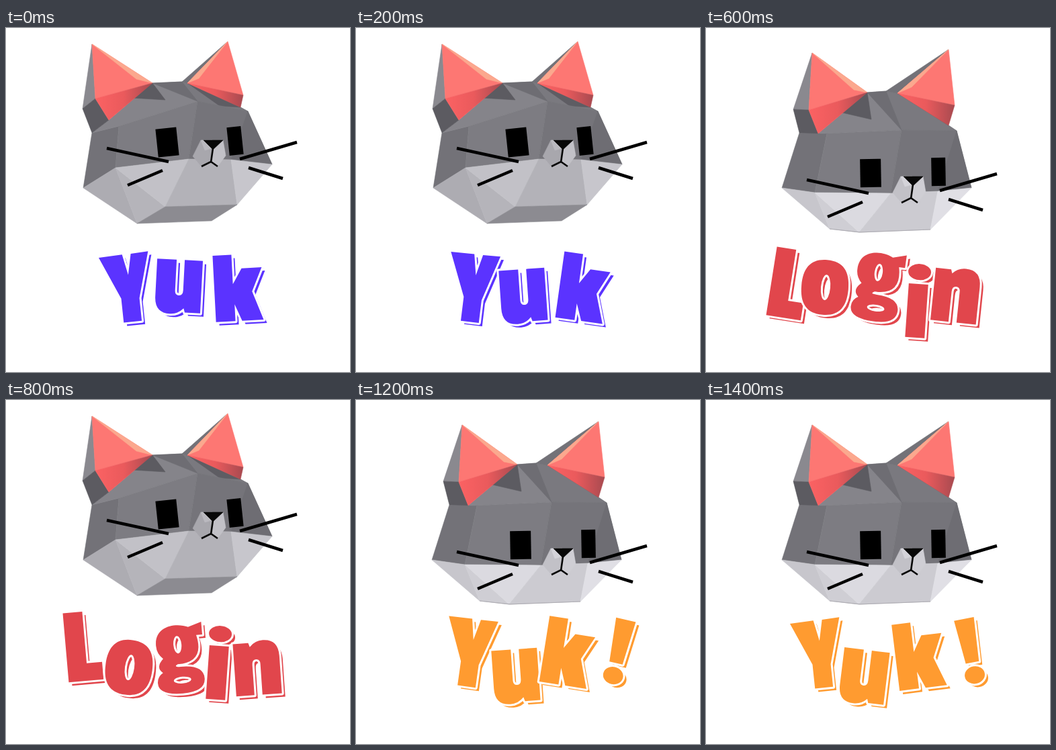
An HTML page that plays this animation: 512 by 512 pixels, repeating every 1600 ms.

```html
<!DOCTYPE html>
<html lang="id">
<head>
<meta charset="utf-8">
<title>Yuk Login</title>
<style>
html, body { margin: 0; width: 100%; height: 100%; overflow: hidden; background: #fff; }
svg { display: block; width: 100%; height: 100%; }
</style>
</head>
<body>
<svg id="stage" viewBox="0 0 512 512" role="img" aria-label="Yuk Login Yuk!">
  <defs>
    <linearGradient id="shade" x2="1">
      <stop offset="0" stop-color="#fb6263"/><stop offset="0.5" stop-color="#ea5a5c"/><stop offset="1" stop-color="#a84a50"/>
    </linearGradient>
  </defs>
</svg>
<script>
const NS = "http://www.w3.org/2000/svg";
const stage = document.getElementById("stage");

function add(parent, tag, attrs) {
  const el = document.createElementNS(NS, tag);
  for (const key in attrs) el.setAttribute(key, attrs[key]);
  parent.appendChild(el);
  return el;
}

const grey = light => {
  const v = Math.round(light * 255);
  return `rgb(${v},${v - 1},${v + 5})`;
};

function facet(parent, points, fill) {
  add(parent, "polygon", { points, fill, stroke: fill, "stroke-width": 0.6, "stroke-linejoin": "round" });
}

// One mesh for both head poses: corners are named by these letters, in order
const corners = "ABCDEFGHIJKLMNOPRSTUVWXYZcef";
const fur = {
  FMRL: 0.45, DEHIKONMF: 0.52, HIKON: 0.48, EHN: 0.43, EZY: 0.36, IcK: 0.37,
  MNSR: 0.49, NOPTS: 0.46, OPT: 0.43
};
const mask = { LRU: 0.68, RVU: 0.71, RSV: 0.76, STWV: 0.70, TPW: 0.78, UVWX: 0.55 };
const ears = {
  ABC: grey(0.54), BCDF: grey(0.36), ACE: "#fd7773", AEe: "#fba88e", CED: "url(#shade)",
  GHI: grey(0.45), GIJ: "#fd7773", GIf: "#fba88e", IJK: "url(#shade)"
};

const poses = [
  {
    mesh: "128,24 114,120 133,105 153,137 218,82 128,156 330,20 262,80 270,82 353,100 349,118 " +
      "115,238 168,146 285,109 360,124 396,203 163,208 272,195 335,196 195,291 237,266 344,263 " +
      "306,287 237,107 187,104 318,116 194,76 287,75",
    glow: 0, eyes: [0, 0], eyeTurn: -6, muzzle: [0, 0], whiskers: [0, 0]
  },
  {
    mesh: "158,37 130,121 153,122 167,157 240,96 139,156 361,32 268,94 285,97 370,115 361,145 " +
      "113,238 180,157 291,152 373,153 395,238 162,245 275,246 345,243 184,299 228,304 334,300 " +
      "230,304 246,136 203,126 332,126 220,92 306,88",
    glow: 0.1, eyes: [5, 46], eyeTurn: -1, muzzle: [0, 54], whiskers: [0, 47]
  }
];

function makeCat({ mesh, glow, eyes, eyeTurn, muzzle, whiskers }) {
  const cat = add(stage, "g", {});
  const at = mesh.split(" ");
  const pick = names => [...names].map(c => at[corners.indexOf(c)]).join(" ");
  const group = ([x, y]) => add(cat, "g", { transform: `translate(${x} ${y})` });

  for (const names in fur) facet(cat, pick(names), grey(fur[names]));
  for (const names in mask) facet(cat, pick(names), grey(mask[names] + glow));
  for (const names in ears) facet(cat, pick(names), ears[names]);

  const look = group(eyes);
  for (const [x, y, w] of [[240, 170, 31], [341, 168, 21]])
    add(look, "rect", { x: -w / 2, y: -21, width: w, height: 42, transform: `translate(${x} ${y}) rotate(${eyeTurn})` });

  const nose = group(muzzle);
  facet(nose, "278,191 290,167 307,179 305,200 291,206", grey(0.66 + glow));
  facet(nose, "307,179 323,167 327,190 315,206 305,200", grey(0.76 + glow / 2));
  facet(nose, "290,167 307,167 307,179 296,182", grey(0.73 + glow));
  facet(nose, "294,167 323,167 308,181", "#080808");
  add(nose, "path", { d: "M308 179L305 200M291 206L305 199L315 206", fill: "none", stroke: "#080808", "stroke-width": 2.6 });

  add(group(whiskers), "path", {
    d: "M150 179L242 199M181 234L233 212M348 195L433 170M361 208L412 224", stroke: "#000", "stroke-width": 4.5
  });
  return cat;
}

// Letter outlines around their own centre
const oval = (x, y, rx, ry) =>
  `M${x - rx},${y}a${rx},${ry} 0 1 0 ${2 * rx},0a${rx},${ry} 0 1 0 ${-2 * rx},0Z`;

const glyphs = {
  Y: "M-35,-50L0,-51L6,-20L13,-51L39,-52L19,16V50H-8V14Z",
  u: "M-35,-40H-6V6Q-6,13 0,13Q6,13 6,5V-40H33V38H10L8,32Q0,41 -12,41Q-35,41 -35,16Z",
  k: "M-35,-50H-7V-6L7,-29H37L21,6L36,49H4L-6,24V49H-35Z",
  "!": "M-15,-48H15L10,18H-10Z" + oval(0, 37, 15, 13),
  L: "M-27,-53H2V24H25V50H-27Z",
  o: "M0,-41C24,-41 35,-27 35,0C35,27 24,41 0,41C-24,41 -35,27 -35,0C-35,-27 -24,-41 0,-41Z" + oval(1, 0, 7, 19),
  g: "M36,-52V-33H27Q37,8 -4,8Q-12,12 0,12Q34,12 34,32Q34,52 0,52Q-36,52 -36,34Q-36,24 -27,19" +
     "Q-38,10 -25,-2Q-34,-10 -34,-22C-34,-52 -2,-54 16,-46Z" + oval(-2, -21, 6, 13) + oval(1, 32, 13, 5),
  i: "M-15,-26H14V54H-15Z" + oval(0, -44, 17, 12)
};

function makeWord([color, ...letters]) {
  const word = add(stage, "g", { "fill-rule": "evenodd", fill: color, "stroke-linejoin": "round" });
  for (const [char, x, y, turn] of letters) {
    // "n" is an upside-down "u"
    const d = glyphs[char === "n" ? "u" : char];
    const spin = char === "n" ? turn + 180 : turn;
    const draw = (shift, outline) => add(word, "path", {
      d, transform: `translate(${x + shift} ${y + shift}) rotate(${spin})`, ...outline
    });
    draw(5);
    draw(0, { stroke: "#fff", "stroke-width": 6, "paint-order": "stroke" });
  }
  return word;
}

const purple = "#5b33ff", red = "#e1464c", orange = "#ff9b30";
const words = [
  [purple, ["Y", 178, 388, -6], ["u", 258, 385, 3], ["k", 345, 387, -3]],
  [purple, ["Y", 170, 387, 7], ["u", 250, 399, -4], ["k", 338, 387, 8]],
  [red, ["L", 116, 368, -5], ["o", 183, 398, 8], ["g", 259, 385, -5], ["i", 316, 392, 4], ["n", 373, 399, -4]],
  [red, ["L", 124, 382, 9], ["o", 177, 386, 5], ["g", 256, 385, 8], ["i", 315, 407, 4], ["n", 371, 398, 6]],
  [orange, ["Y", 166, 376, 8], ["u", 239, 411, -4], ["k", 315, 376, 9], ["!", 391, 374, 13]],
  [orange, ["Y", 165, 379, -6], ["u", 236, 412, 7], ["k", 317, 380, -7], ["!", 393, 373, -11]]
].map(makeWord);
const cats = poses.map(makeCat);

// Steps of 200 ms: which cat, which word
const steps = [[0, 0], [0, 1], [1, 2], [1, 3], [0, 2], [0, 3], [1, 4], [1, 5]];
const show = (list, index) =>
  list.forEach((el, i) => el.setAttribute("display", i === index ? "inline" : "none"));

function render(time) {
  const [cat, word] = steps[Math.floor(time % 1600 / 200)];
  show(cats, cat);
  show(words, word);
}

const start = performance.now();
function tick() {
  render(performance.now() - start);
  requestAnimationFrame(tick);
}
tick();
</script>
</body>
</html>
```
